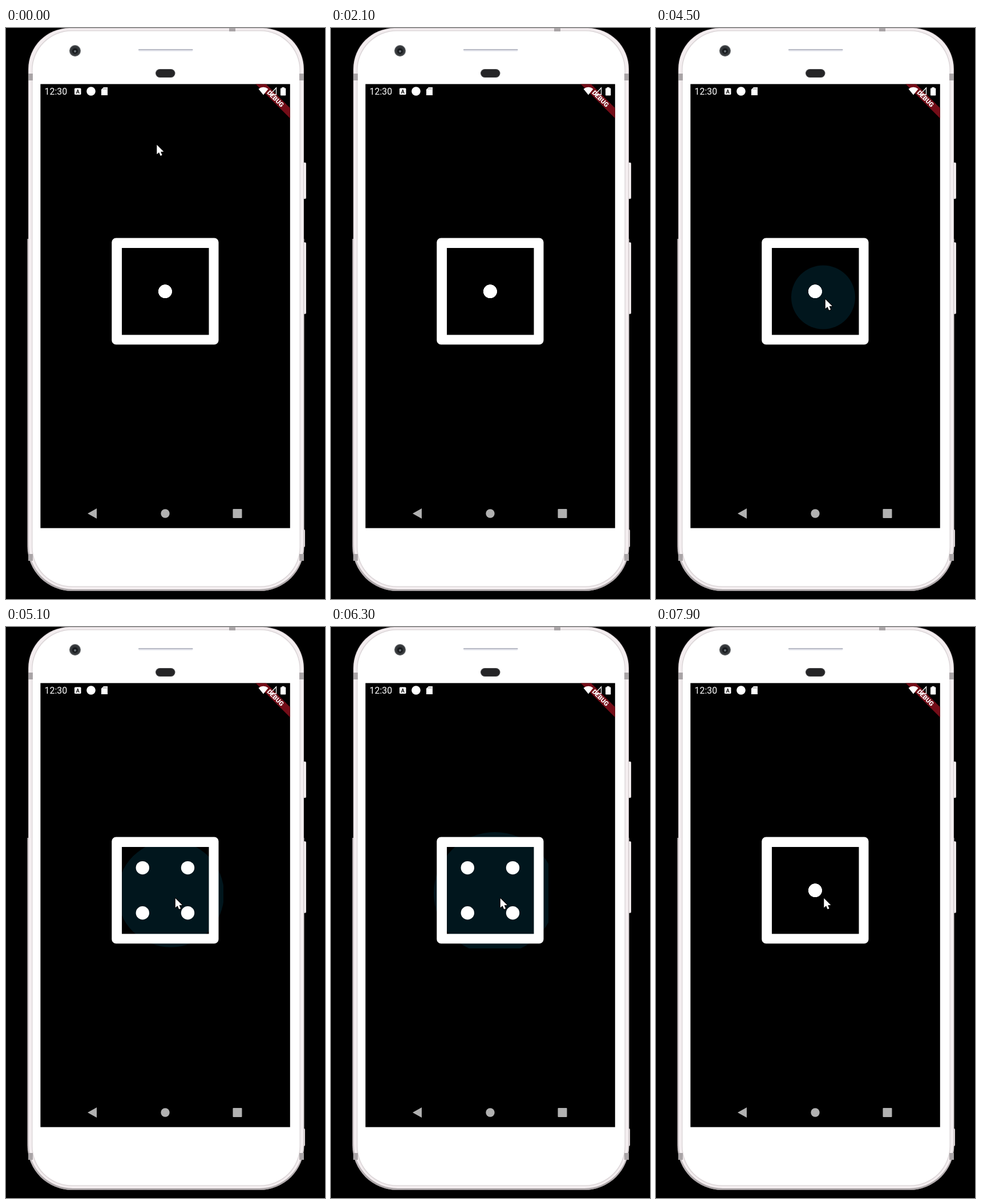
Write an HTML page with a canvas that moves like this. It is 559 px wide and 1002 px high and loops after 8 s.

```html
<!DOCTYPE html>
<html lang="en">
<head>
<meta charset="utf-8">
<title>Dice</title>
<style>
  html, body { margin: 0; width: 100%; height: 100%; overflow: hidden; background: #000; }
  canvas { display: block; width: 559px; height: 1002px; }
</style>
</head>
<body>
<canvas id="stage" width="559" height="1002"></canvas>
<script>
const ctx = document.getElementById('stage').getContext('2d');
const LOOP = 8000, STEP = 100;
const LEFT = 60.4, TOP = 98.4, RIGHT = 497.8, BOTTOM = 877.6;

// each stroke bends from the previous end through a control point to its own end
const STROKES = [
  { from: 0, to: 0, via: [264, 205], end: [264, 205] },
  { from: 800, to: 1000, via: [300, 255], end: [348, 324] },
  { from: 1400, to: 1600, via: [400, 390], end: [495, 470] },
  { from: 1600, to: 2000, via: [330, 200], end: [91, 3] },
  { from: 2400, to: 2400, via: [83, 6], end: [83, 6] },
  { from: 2600, to: 2600, via: [445, 369], end: [445, 369] },
  { from: 2800, to: 3400, via: [420, 470], end: [184, 151] },
  { from: 3500, to: 4200, via: [448, 480], end: [296.5, 476] },
  { from: 6900, to: 7900, via: [293.5, 476], end: [294, 476] }
];
const offStage = t => t >= 2100 && t < 2400;

const TAPS = [
  { down: 4500, up: 5050, size: 56 },
  { down: 6100, up: 6100, size: 33 },
  { down: 7000, up: 7200, size: 29 }
];

function rect(x, y, w, h, color) {
  ctx.fillStyle = color;
  ctx.fillRect(x, y, w, h);
}

function round(x, y, w, h, r, color) {
  ctx.fillStyle = color;
  ctx.beginPath();
  ctx.roundRect(x, y, w, h, r);
  ctx.fill();
}

function disc(x, y, r, color) {
  ctx.fillStyle = color;
  ctx.beginPath();
  ctx.arc(x, y, r, 0, Math.PI * 2);
  ctx.fill();
}

function trace(points) {
  ctx.beginPath();
  points.forEach(([x, y]) => ctx.lineTo(x, y));
  ctx.closePath();
}

function poly(points, color) {
  trace(points);
  ctx.fillStyle = color;
  ctx.fill();
}

function text(str, x, y, font, color, align = 'left') {
  ctx.font = font + ' Roboto, sans-serif';
  ctx.textAlign = align;
  ctx.fillStyle = color;
  ctx.fillText(str, x, y);
}

function drawBody() {
  rect(0, 0, 559, 1002, '#000');
  // side buttons
  for (const [y, h] of [[236, 64], [376, 126]]) {
    round(519, y, 7, h, 2, '#d9d2d4');
    round(520, y + 1, 5, h - 3, 1, '#f7f2f3');
  }
  round(519, 880, 5, 31, 2, '#e2dbdd');

  const rim = ctx.createLinearGradient(0, 900, 0, 988);
  rim.addColorStop(0, '#cfc7ca');
  rim.addColorStop(1, '#aaa4a6');
  round(37.5, 370, 485, 618, [0, 0, 78, 78], rim);
  round(39, 0, 483, 988, [72, 72, 78, 78], rim);
  round(40, 1, 481, 984, [71, 71, 77, 77], '#f4eef0');
  round(45, 4, 471, 977, 70, '#ddd7d9');
  round(46.5, 5.5, 468, 974, 69, '#fff');

  // antenna bands
  for (const y of [80, 923]) {
    rect(39, y, 8, 12, '#aaa5a7');
    rect(514, y, 8, 12, '#aaa5a7');
  }
  rect(391, 0, 11, 6, '#aaa5a7');

  disc(121, 40, 10, '#55585b');
  disc(121, 40, 8.5, '#34373a');
  disc(121, 40.5, 5, '#171a1d');
  disc(121, 41, 2, '#6a7178');

  round(232, 37, 95.5, 4, 2, '#e6e7ee');
  round(232, 37, 95.5, 1.8, 1, '#b2b5c0');
  round(262, 72, 34.5, 15, 7.5, '#4a4a4c');
  round(263, 73, 32.5, 13, 6.5, '#252527');
  rect(LEFT, TOP, RIGHT - LEFT, BOTTOM - TOP, '#000');
}

// runs paint in axes turned 45 degrees about the top right corner
function inCorner(paint) {
  ctx.save();
  ctx.beginPath();
  ctx.rect(LEFT, TOP, RIGHT - LEFT, BOTTOM - TOP);
  ctx.clip();
  ctx.translate(RIGHT, TOP);
  ctx.rotate(Math.PI / 4);
  paint();
  ctx.restore();
}

function drawStatus() {
  text('12:30', 67.6, 117, '15.9px', '#fff');
  round(120, 105.5, 11.5, 11.5, 1.5, '#fff');
  text('A', 125.7, 114.6, 'bold 9px', '#000', 'center');
  disc(149, 111, 7.8, '#fff');
  poly([[171, 104], [178, 104], [178, 118], [167, 118], [167, 108]], '#fff');
  for (const x of [170.5, 173, 175.5]) rect(x, 105.5, 1, 2.5, '#777');

  inCorner(() => rect(-50, 29.8, 100, 12.8, '#740d18'));

  // wifi, signal and battery
  ctx.fillStyle = '#fff';
  ctx.beginPath();
  ctx.moveTo(451, 117.5);
  ctx.lineTo(442.5, 107);
  ctx.quadraticCurveTo(451, 100.5, 459.5, 107);
  ctx.fill();
  trace([[462.5, 117], [473.5, 105], [473.5, 117]]);
  ctx.strokeStyle = '#fff';
  ctx.lineWidth = 1.3;
  ctx.stroke();
  round(481, 105.5, 9.3, 13, 1, '#fff');
  rect(483.5, 104, 4.3, 2, '#fff');

  inCorner(() => text('DEBUG', 0, 40.2, '900 11.2px', '#fff', 'center'));
}

function drawNav() {
  const gray = '#b1b1b1';
  poly([[143, 852], [159, 843], [159, 861]], gray);
  disc(279, 852, 7.7, gray);
  round(397.5, 844, 16, 16, 1, gray);
}

// grows slowly while held, then quickly; fades and is cut after release
function drawRipple(t, { down, up, size }) {
  const freed = Math.max(0, t - up);
  if (t < down || freed >= 500) return;
  const held = Math.min(75, size + 0.19 * (Math.min(t, up) - down));
  const r = Math.min(150, held + 0.37 * freed);
  ctx.save();
  ctx.beginPath();
  ctx.rect(177, 360, 204, 204);
  ctx.clip();
  ctx.globalAlpha = 1 - Math.max(0, freed - 200) / 600;
  // the centre drifts to the middle of the button as it grows
  disc(299.4 - 0.115 * r, 478.3 - 0.105 * r, r, '#01161d');
  ctx.restore();
}

function drawDie(four) {
  ctx.fillStyle = '#fff';
  ctx.beginPath();
  ctx.roundRect(185.3, 368.5, 187.2, 187, 7.5);
  ctx.rect(203, 386, 152.5, 152.5);
  ctx.fill('evenodd');
  const d = four ? 39.6 : 0;
  for (const sx of [-d, d])
    for (const sy of [-d, d]) disc(278.9 + sx, 462.2 + sy, 11.7, '#fff');
}

function pointerAt(t) {
  const i = STROKES.findLastIndex(s => t >= s.from);
  const { from, to, via, end } = STROKES[i];
  if (t >= to) return end;
  const u = (t - from) / (to - from), v = 1 - u;
  return STROKES[i - 1].end.map((p, k) => v * v * p + 2 * u * v * via[k] + u * u * end[k]);
}

function drawPointer(t) {
  if (offStage(t)) return;
  ctx.save();
  ctx.translate(...pointerAt(t));
  trace([[0.3, 0], [0.3, 16.6], [4.1, 13.2], [6.7, 19.3], [9.6, 18.1], [7.1, 12.2], [12.3, 12]]);
  ctx.lineWidth = 2;
  ctx.lineJoin = 'round';
  ctx.strokeStyle = '#000';
  ctx.stroke();
  ctx.fillStyle = '#fff';
  ctx.fill();
  ctx.restore();
}

function draw(t) {
  drawBody();
  drawStatus();
  drawNav();
  TAPS.forEach(tap => drawRipple(t, tap));
  drawDie(t > TAPS[0].up && t <= TAPS[2].up);
  drawPointer(t);
}

const start = performance.now();
function tick() {
  const t = (performance.now() - start) % LOOP;
  draw(Math.floor(t / STEP) * STEP);
  requestAnimationFrame(tick);
}
tick();
</script>
</body>
</html>
```
